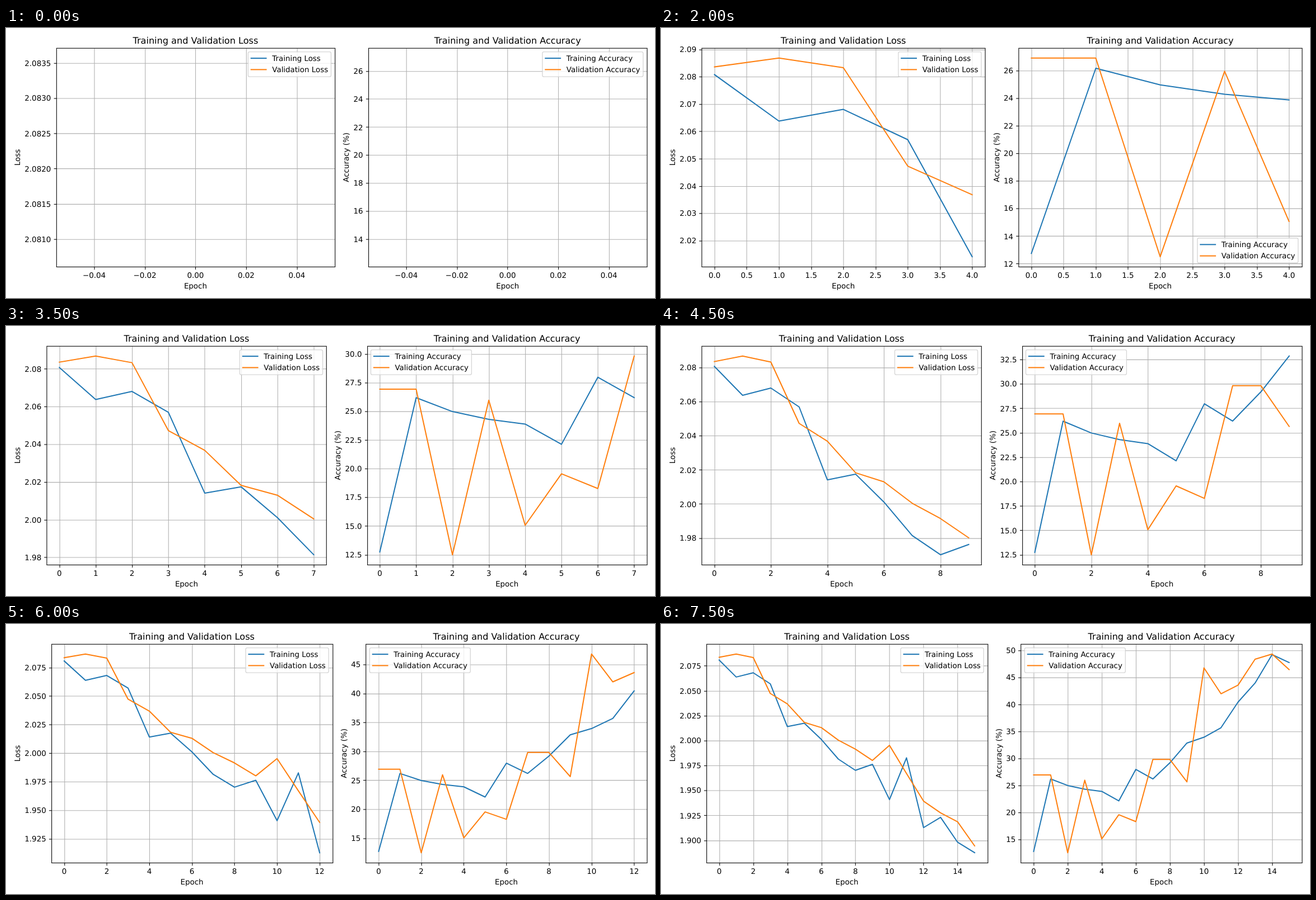
These frames come from a looping animation (1159 by 483 pixels, 8000 ms). An HTML page with a canvas:

```html
<!DOCTYPE html>
<html lang="en">
<head>
<meta charset="utf-8">
<title>Training curves</title>
<style>
html, body { margin: 0; width: 100%; height: 100%; overflow: hidden; background: #fff; }
canvas { display: block; }
</style>
</head>
<body>
<canvas id="stage" width="1159" height="483"></canvas>
<script>
const ctx = document.getElementById('stage').getContext('2d');
const STEP_MS = 500, EPOCHS = 16;

// Layout units: a 1200 x 500 figure at 100 dpi, scaled to the stage.
const PT = 100 / 72, EM = 10 * PT;
const TOP = 37.2, BOTTOM = 442, RIGHT = 1185, PAD = 44.2;
const COLORS = ['#1f77b4', '#ff7f0e'];

const charts = [
  {
    name: 'Loss', label: 'Loss',
    series: [
      [2.080747, 2.063754, 2.068025, 2.05695, 2.01410, 2.01745, 2.0011, 1.9814,
       1.97016, 1.9762, 1.9408, 1.9827, 1.9127, 1.9230, 1.8980, 1.8875],
      [2.083573, 2.086824, 2.08329, 2.04727, 2.0368, 2.01825, 2.01299, 2.0004,
       1.9914, 1.9801, 1.9952, 1.9670, 1.9393, 1.9275, 1.9185, 1.8944]
    ]
  },
  {
    name: 'Accuracy', label: 'Accuracy (%)',
    series: [
      [12.74, 26.18, 24.97, 24.29, 23.88, 22.12, 27.96, 26.19,
       29.18, 32.85, 33.93, 35.69, 40.44, 43.97, 49.25, 47.77],
      // correct answers out of 312
      [84, 84, 39, 81, 47, 61, 57, 93, 93, 80, 146, 131, 136, 151, 154, 145].map(k => k / 3.12)
    ]
  }
];

// Legend anchors in order of preference.
const ANCHORS = [[1, 0], [0, 0], [0, 1], [1, 1], [1, .5], [0, .5], [.5, 1], [.5, 0], [.5, .5]];

const snap = v => Math.round(v) + .5;

function makeAxis(min, max) {
  const margin = (max - min) * .05 || .055;
  const lo = min - margin, hi = max + margin;
  const raw = (hi - lo) / 9, power = 10 ** Math.floor(Math.log10(raw));
  const step = [1, 2, 2.5, 5, 10].find(m => m * power >= raw) * power;
  let digits = 0;
  while (Math.abs(step * 10 ** digits - Math.round(step * 10 ** digits)) > 1e-6) digits++;
  const ticks = [];
  for (let k = Math.ceil(lo / step); k <= hi / step; k++) {
    ticks.push({ value: k * step, text: (k * step).toFixed(digits).replace('-', '\u2212') });
  }
  return { lo, hi, ticks };
}

// Digits are .636 em wide, the point .318 em.
const tickWidth = ({ text }) => EM * (text.length * .636 - (text.includes('.') ? .318 : 0));

function text(str, x, y, align = 'center', size = EM) {
  ctx.font = `${size}px "DejaVu Sans", sans-serif`;
  ctx.textAlign = align;
  ctx.fillStyle = '#000';
  ctx.fillText(str, x, y);
}

function stroke(points, color, width) {
  ctx.beginPath();
  points.forEach(([x, y]) => ctx.lineTo(x, y));
  ctx.strokeStyle = color;
  ctx.lineWidth = width;
  ctx.stroke();
}

function crowding(box, lines) {
  const inside = ([x, y]) => x > box.x && x < box.x + box.w && y > box.y && y < box.y + box.h;
  const crosses = line => line.slice(1).some(([x, y], i) => {
    const [px, py] = line[i];
    for (let s = 0; s <= 1; s += .005) {
      if (inside([px + (x - px) * s, py + (y - py) * s])) return true;
    }
    return false;
  });
  return lines.reduce((sum, line) => sum + line.filter(inside).length + crosses(line), 0);
}

function drawLegend(chart, left, right, lines) {
  const labels = ['Training ', 'Validation '].map(s => s + chart.name);
  ctx.font = `${EM}px "DejaVu Sans", sans-serif`;
  const w = EM * 3.6 + Math.max(...labels.map(s => ctx.measureText(s).width));
  const h = 46.1, gap = EM / 2;
  let best, least = Infinity;
  for (const [ax, ay] of ANCHORS) {
    const box = {
      x: left + gap + ax * (right - left - 2 * gap - w),
      y: TOP + gap + ay * (BOTTOM - TOP - 2 * gap - h), w, h
    };
    const score = crowding(box, lines);
    if (score < least) [best, least] = [box, score];
  }
  const { x, y } = best;
  ctx.globalAlpha = .8;
  ctx.beginPath();
  ctx.roundRect(x, y, w, h, EM * .2);
  ctx.fillStyle = '#fff';
  ctx.fill();
  ctx.strokeStyle = '#ccc';
  ctx.lineWidth = PT;
  ctx.stroke();
  ctx.globalAlpha = 1;
  labels.forEach((label, i) => {
    const rowY = y + i * 21, lineY = Math.round(rowY + 11.9);
    const from = x + EM * .4;
    stroke([[from, lineY], [from + EM * 2, lineY]], COLORS[i], 1.5 * PT);
    text(label, x + EM * 3.2, Math.round(rowY + 16.8), 'left');
  });
}

function drawChart(chart, left, width, xAxis, yAxis, labelWidth, last) {
  const right = left + width, middle = left + width / 2;
  const toX = v => left + (v - xAxis.lo) / (xAxis.hi - xAxis.lo) * width;
  const toY = v => BOTTOM - (v - yAxis.lo) / (yAxis.hi - yAxis.lo) * (BOTTOM - TOP);
  const [x0, x1, y0, y1] = [left, right, TOP, BOTTOM].map(snap);
  const thin = .8 * PT, tick = 3.5 * PT;

  ctx.lineCap = 'butt';
  for (const t of xAxis.ticks) {
    const x = snap(toX(t.value));
    stroke([[x, y0], [x, y1]], '#b0b0b0', thin);
    stroke([[x, y1], [x, y1 + tick]], '#000', thin);
    text(t.text, toX(t.value), 462.3);
  }
  for (const t of yAxis.ticks) {
    const y = snap(toY(t.value));
    stroke([[x0, y], [x1, y]], '#b0b0b0', thin);
    stroke([[x0 - tick, y], [x0, y]], '#000', thin);
    text(t.text, left - 2 * tick, Math.round(toY(t.value) + 5.2), 'right');
  }

  ctx.lineCap = 'square';
  ctx.lineJoin = 'round';
  const lines = chart.series.map(s => s.slice(0, last + 1).map((v, i) => [toX(i), toY(v)]));
  if (last) lines.forEach((line, i) => stroke(line, COLORS[i], 1.5 * PT));

  ctx.strokeStyle = '#000';
  ctx.lineWidth = thin;
  ctx.lineJoin = 'miter';
  ctx.strokeRect(x0, y0, x1 - x0, y1 - y0);

  text('Training and Validation ' + chart.name, middle, 29, 'center', 12 * PT);
  text('Epoch', middle, 482.3);
  ctx.save();
  ctx.translate(left - labelWidth - 18.2, (TOP + BOTTOM) / 2);
  ctx.rotate(-Math.PI / 2);
  text(chart.label, 0, 0);
  ctx.restore();
  drawLegend(chart, left, right, lines);
}

function draw(last) {
  ctx.setTransform(1159 / 1200, 0, 0, 483 / 500, 0, 0);
  ctx.textRendering = 'geometricPrecision';
  ctx.fillStyle = '#fff';
  ctx.fillRect(0, 0, 1200, 500);
  const xAxis = makeAxis(0, last);
  const yAxes = charts.map(c => {
    const shown = c.series.flatMap(s => s.slice(0, last + 1));
    return makeAxis(Math.min(...shown), Math.max(...shown));
  });
  const labelWidths = yAxes.map(a => Math.max(...a.ticks.map(tickWidth)));
  const [left, gap] = labelWidths.map(w => PAD + w);
  const width = (RIGHT - left - gap) / 2;
  charts.forEach((c, i) =>
    drawChart(c, i ? RIGHT - width : left, width, xAxis, yAxes[i], labelWidths[i], last));
}

const start = performance.now();
let shown = -1;
function frame() {
  const last = Math.floor((performance.now() - start) / STEP_MS) % EPOCHS;
  if (last !== shown) draw(shown = last);
  requestAnimationFrame(frame);
}
frame();
</script>
</body>
</html>
```
